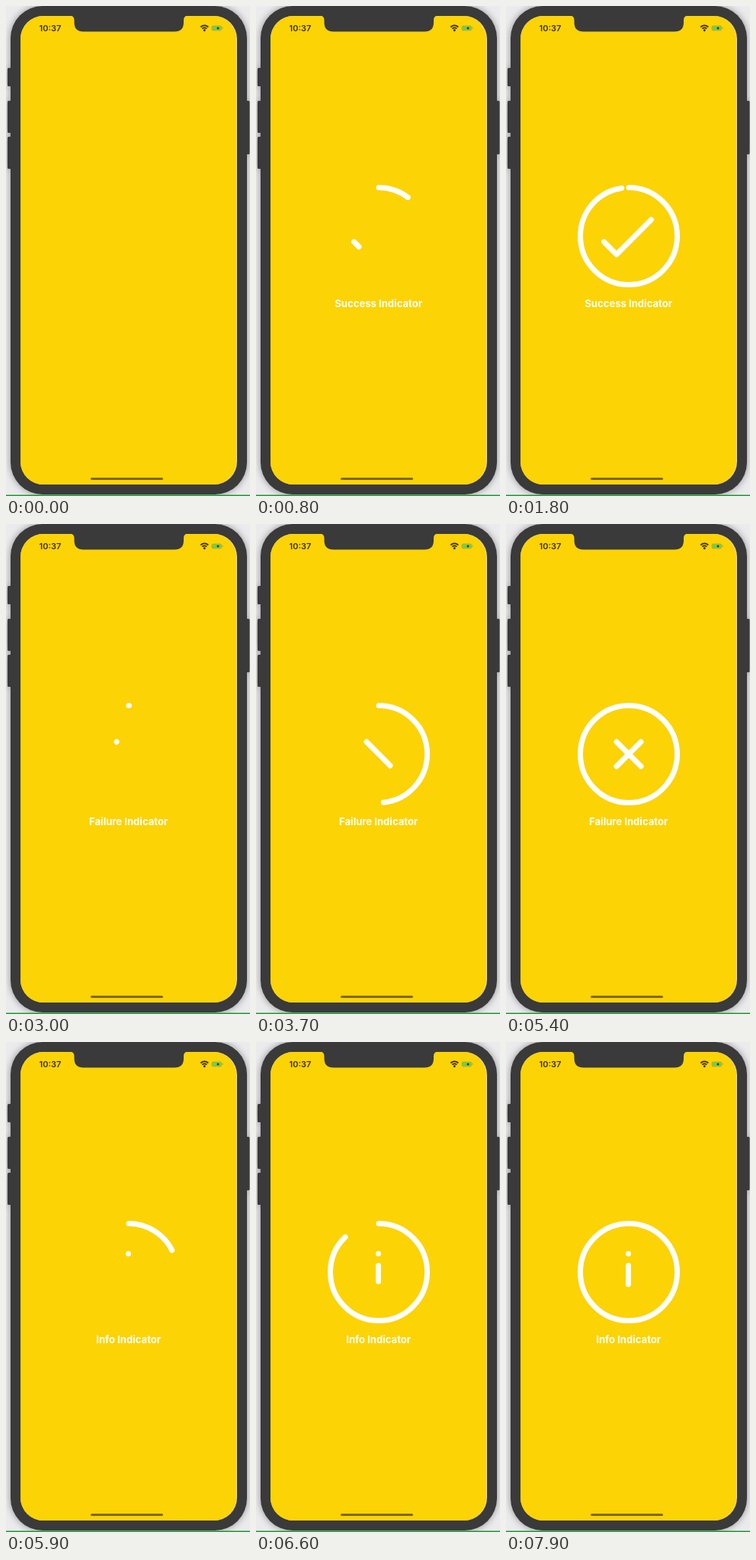
Animation, 320 px wide and 641 px high, one loop 8 s. Source, as an HTML page:

```html
<!DOCTYPE html>
<html lang="en">
<head>
<meta charset="utf-8">
<title>Status indicators</title>
<style>
  html, body { margin: 0; height: 100%; overflow: hidden; background: #ebebed; }
  svg { display: block; width: 100vw; height: 100vh; }
  text { font: 700 13.1px Inter, "Liberation Sans", sans-serif; }
  .body { fill: #3a3a3b; filter: drop-shadow(0 0 5px #0006); }
  .soft { filter: blur(.4px); }
  .draw { fill: none; stroke: #fff; stroke-width: 7; stroke-linecap: round; stroke-linejoin: round; }
</style>
</head>
<body>
<svg viewBox="0 0 320 641">
  <!-- phone body -->
  <g class="body">
    <rect x="2" y="81" width="6" height="24" rx="1.5"/>
    <rect x="2" y="124" width="6" height="42" rx="1.5"/>
    <rect x="2" y="171" width="6" height="42" rx="1.5"/>
    <rect x="314" y="124" width="5.500" height="70" rx="1.5"/>
    <rect x="6" y="0" width="310" height="639" rx="42"/>
  </g>
  <rect y="639.500" width="320" height="1.500" fill="#1f9730"/>

  <g class="soft">
    <rect x="19" y="13" width="284" height="613" rx="30" fill="#e8d9a0"/>
    <rect x="19" y="13" width="283" height="613" rx="30" fill="#fcd304"/>
    <path d="M84 12.500q5.500 .5 5.500 6v3q0 12 12 12H221q12 0 12-12v-3q0-5.500 5.500-6z" fill="#3a3a3b"/>

    <!-- status bar -->
    <text x="43.500" y="33" style="font-size:11px;font-weight:600" fill="#3a310c">10:37</text>
    <g fill="none" stroke="#332b0a" stroke-width="1.700">
      <path d="M255.300 27.500q5-4.400 10 0M257.200 29.700q3.100-2.600 6.200 0"/>
      <circle cx="260.300" cy="31.700" r=".6"/>
    </g>
    <rect x="270" y="26" width="12.500" height="6" rx="1.500" fill="#7ccb4c" stroke="#b4ad35" stroke-width=".8"/>
    <circle cx="278" cy="29" r="1.500" fill="#1f4a2a"/>
    <path d="M284 27.500v2.500" stroke="#a5a83a"/>
    <rect x="111" y="617" width="95" height="3" rx="1.500" fill="#80680c"/>

    <g id="hud"></g>
    <text id="label" x="160.700" y="394.300" text-anchor="middle" fill="#fff"></text>
  </g>
</svg>
<script>
const LOOP = 8000, FIRST = 465, GAP = 2500, DRAW = 1500;
const RING = ['M161 237.500a63.500 63.500 0 0 1 0 127a63.500 63.500 0 0 1 0-127', 0, 1];

// Each stroke: path, and the share of the drawing time it fills.
const scenes = [
  ['Success Indicator', RING, ['M128.500 308.500L145 325L192 278', 0, 1]],
  ['Failure Indicator', RING, ['M145 285L177 317', 0, .5], ['M177 285L145 317', .5, 1]],
  ['Info Indicator', RING, ['M160.500 277v.1', 0, .01], ['M160.500 292.500V317', .18, 1]]
];
const hud = document.getElementById('hud');
const label = document.getElementById('label');

const groups = scenes.map(([, ...strokes]) => {
  const g = document.createElementNS(hud.namespaceURI, 'g');
  g.setAttribute('class', 'draw');
  g.innerHTML = strokes.map(([d]) => `<path d="${d}" pathLength="1"/>`).join('');
  return hud.appendChild(g);
});

// cubic-bezier(.42, 0, .58, 1)
function ease(x) {
  let lo = 0, hi = 1;
  for (let i = 0; i < 24; i++) {
    const u = (lo + hi) / 2, v = 1 - u;
    if (1.26 * u * v * v + 1.74 * u * u * v + u * u * u < x) lo = u; else hi = u;
  }
  return lo * lo * (3 - 2 * lo);
}

function render(now) {
  const t = now % LOOP - FIRST;
  const current = Math.min(Math.floor(t / GAP), 2);
  label.textContent = current < 0 ? '' : scenes[current][0];
  groups.forEach((g, i) => g.style.display = i === current ? '' : 'none');
  if (current >= 0) {
    const p = ease(Math.min((t - current * GAP) / DRAW, 1));
    scenes[current].slice(1).forEach(([, from, to], i) => {
      const q = Math.min((p - from) / (to - from), 1);
      const path = groups[current].children[i];
      path.style.visibility = q > 0 ? 'visible' : 'hidden';
      path.setAttribute('stroke-dasharray', q < .9999 ? `${Math.max(q, 0)} 2` : 'none');
    });
  }
}

const start = performance.now();
function tick() {
  render(performance.now() - start);
  requestAnimationFrame(tick);
}
tick();
</script>
</body>
</html>
```
